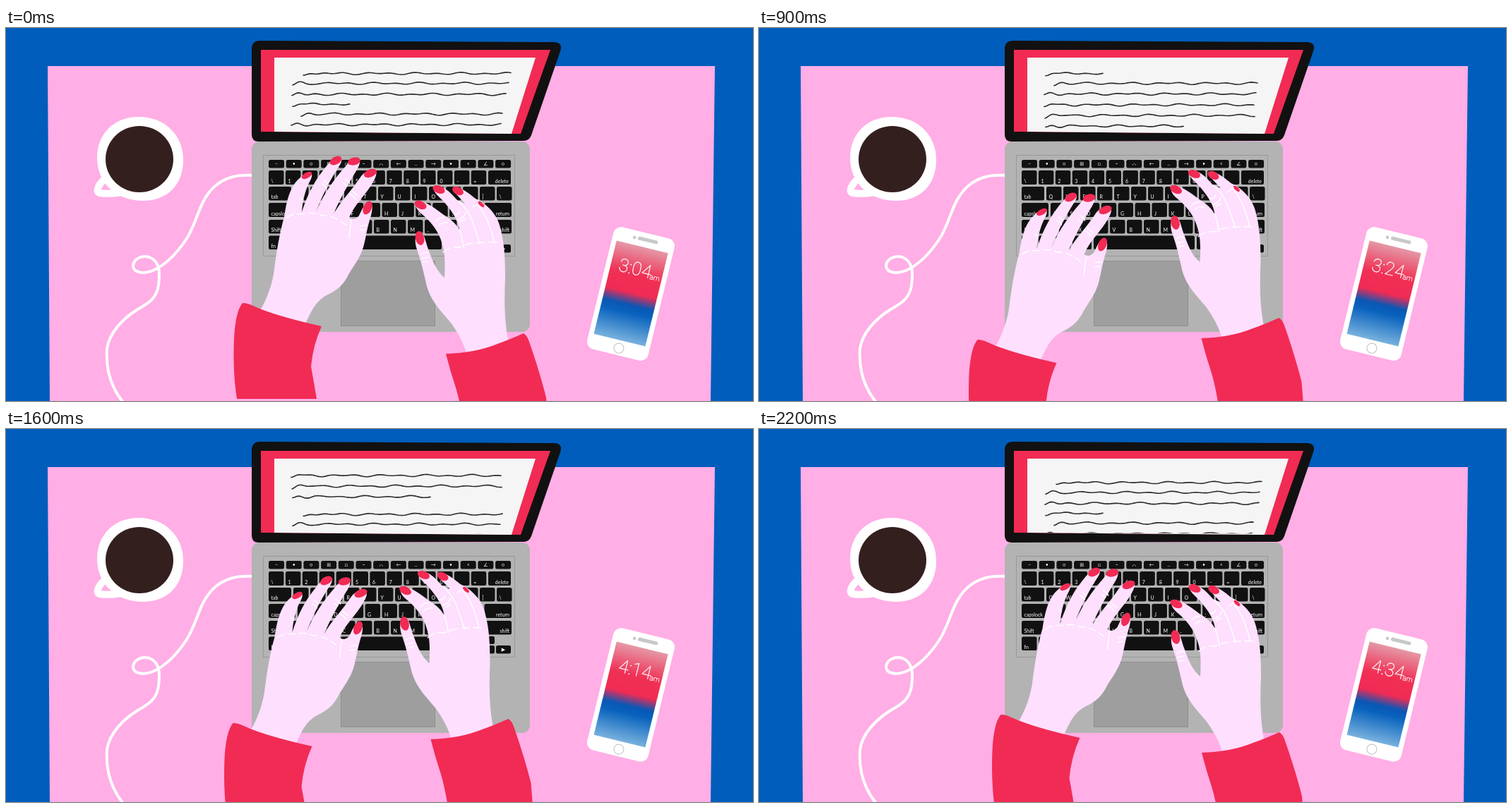
An HTML page that plays this animation: 1058 px wide and 529 px high, repeating every 2.4 s.

```html
<!DOCTYPE html>
<html lang="en">
<meta charset="utf-8">
<title>Typing through the night</title>
<style>
html, body { margin: 0; width: 100%; height: 100%; overflow: hidden; background: #005dbb }
svg { display: block; width: 100%; height: 100% }
.red { fill: #f12b54 }
.skin { fill: #fedffe }
.ink { fill: none; stroke: #fff; stroke-width: 1.5; stroke-linecap: round; stroke-linejoin: round }
#keys rect { fill: #111 }
#keys text { fill: #fff; font: 7px Lato, "Noto Sans", sans-serif }
#clock { fill: #fff; stroke: #fff; stroke-width: .4; font: 100 26px Roboto, sans-serif }
</style>
<svg viewBox="0 0 1058 529">
  <defs>
    <linearGradient id="dusk" x2="0" y2="1">
      <stop offset="0" stop-color="#e498a6"/>
      <stop offset=".3" stop-color="#f03055"/>
      <stop offset=".49" stop-color="#f12b54"/>
      <stop offset=".62" stop-color="#0a57b4"/>
      <stop offset=".7" stop-color="#0862bd"/>
      <stop offset="1" stop-color="#78b1de"/>
    </linearGradient>
    <clipPath id="page"><path d="M380 58H745L716 148.500L380 147Z"/></clipPath>
  </defs>
  <rect width="1058" height="529" fill="#005dbb"/>
  <path d="M59 54H1004L998 529H62Z" fill="#ffaee6"/>

  <!-- cable and cup -->
  <path class="ink" style="stroke-width:4" d="M350 209C325 208 313 212 300 221C273 241 272 275 255 300C241 321 227 335 210 343C195 350 181 347 180 338C180 327 193 322 203 325C219 331 218 349 216 365C213 385 200 391 185 400C166 412 146 432 143 455C141 485 149 510 166 531"/>
  <path d="M139 215C131 222 127 231 132 234Q146 236 164 233" fill="none" stroke="#fff" stroke-width="10" stroke-linejoin="round"/>
  <path d="M188 126C225 126 251 152 251 187C251 223 228 245 194 245C156 245 129 220 129 184C129 150 153 126 188 126Z" fill="#fff"/>
  <ellipse cx="189" cy="186" rx="48" ry="47" fill="#341f1f"/>

  <!-- laptop -->
  <rect x="348" y="161" width="394" height="270" rx="11" fill="#b3b3b3"/>
  <path d="M360 18L777 20Q789 21 785 33L744 152Q741 160 733 160L358 161Q348 161 348 151V30Q348 18 360 18Z" fill="#111"/>
  <path class="red" d="M361 31H771L729 150L361 147Z"/>
  <path d="M380 42H750L716 150L380 147Z" fill="#f5f5f5"/>
  <path id="text" clip-path="url(#page)" fill="none" stroke="#2b2b2b" stroke-width="1.6" stroke-linecap="round" stroke-linejoin="round"/>
  <rect x="364.500" y="180.500" width="356" height="143" fill="none" stroke="#989898"/>
  <rect x="474.500" y="330.500" width="133" height="92" fill="#9e9e9e" stroke="#8f8f8f"/>
  <g id="keys"></g>

  <!-- phone -->
  <g transform="translate(885 377) rotate(13.7)">
    <rect x="-44.500" y="-89" width="89" height="178" rx="11" fill="#fff"/>
    <rect x="-37.500" y="-68.500" width="75" height="136" fill="url(#dusk)"/>
    <circle cx="-14" cy="-79" r="2.300" fill="#c8c8c8"/>
    <rect x="-9" y="-82" width="29" height="5" rx="2.500" fill="#c8c8c8"/>
    <circle cx="1.700" cy="79" r="7" fill="#fff" stroke="#bdbdbd"/>
    <text id="clock" x="-26" y="-27.500"><tspan id="time"></tspan><tspan font-size="10" dx="-1" dy="1">am</tspan></text>
  </g>

  <g id="left">
    <path class="skin" d="M359 402C371 382 378 360 380 342C383 318 388 288 394 268C397 247 401 231 410 219C417 211 424 205 431 205C435 207 433 213 430 218C424 230 420 245 419 261C425 242 434 222 446 206C453 197 462 184 471 182C477 183 476 189 473 194C459 215 448 238 439 261C449 237 464 215 481 196C488 187 496 183 501 187C502 193 498 200 494 206C483 225 471 246 464 264C473 247 490 230 501 213C507 203 518 199 524 203C526 209 521 217 516 225C506 240 493 252 486 269Q494 274 500 266C504 258 508 247 515 246C520 249 519 258 517 266C511 284 510 297 506 311C501 327 492 338 486 348C479 363 470 371 458 377C439 386 433 400 424 420Z"/>
    <g class="red">
      <ellipse rx="8" ry="4" transform="translate(426 209) rotate(-28)"/>
      <ellipse rx="9" ry="5.500" transform="translate(467 188) rotate(-28)"/>
      <ellipse rx="9" ry="5.500" transform="translate(493 189) rotate(-14)"/>
      <ellipse rx="9.500" ry="5.500" transform="translate(516 206) rotate(-22)"/>
      <ellipse rx="5.800" ry="10" transform="translate(512 255) rotate(22)"/>
    </g>
    <path class="ink" stroke-dasharray="10 6" d="M398 269Q407 262 419 264Q435 260 448 266Q463 265 481 279"/>
    <path class="ink" d="M489 272Q487 285 486 298M417 241L421 244M447 221Q452 223 454 227M450 216L456 221M480 214Q486 217 487 221M478 220L483 224M486 235Q493 238 495 243M490 231L498 238M502 281Q507 279 510 280M501 287L508 286"/>
    <path class="red" d="M335 390Q342 390 350 394Q380 408 447 423Q435 449 432 480Q436 502 440 526H327Q321 488 323 440Q325 402 335 390Z"/>
  </g>

  <g id="right">
    <path class="skin" d="M653 464C648 446 640 432 630 418C616 401 600 386 595 362C591 344 588 331 582 314C578 303 579 290 587 289C593 291 594 304 599 316C605 333 611 346 621 354C622 337 622 319 618 307C613 287 600 273 589 264C580 257 577 247 583 245C594 245 608 256 620 265C630 271 637 277 642 286C640 271 630 257 617 243C608 235 602 227 607 223C617 222 629 232 639 244L650 249C644 241 632 232 633 226C640 223 653 232 665 242C681 249 696 265 700 283C706 305 707 328 707 354C706 382 705 413 712 447Z"/>
    <g class="red">
      <ellipse rx="9" ry="5.500" transform="translate(587 251) rotate(25)"/>
      <ellipse rx="9" ry="5.500" transform="translate(613 229) rotate(22)"/>
      <ellipse rx="8.500" ry="5.500" transform="translate(640 231) rotate(28)"/>
      <ellipse rx="5.500" ry="2.500" transform="translate(673 250) rotate(42)"/>
      <ellipse rx="6.200" ry="10" transform="translate(586 298) rotate(-12)"/>
    </g>
    <path class="ink" stroke-dasharray="11 6" d="M619 318Q628 309 642 311Q660 302 696 304"/>
    <path class="ink" d="M642 286Q646 296 648 311M641 246Q656 259 662 279Q667 292 671 306M668 250Q681 267 685 282Q689 291 691 303M588 321Q593 317 598 319M589 327L598 325M591 332L598 331M609 274Q614 268 620 269M613 280Q618 275 626 276M635 264Q641 266 643 259M640 272Q648 271 651 262M644 275L651 271M661 254L667 250"/>
    <path class="red" d="M623 462Q664 461 696 448Q713 442 733 433Q738 436 741 445Q756 488 765 524L768 562H648Q643 529 637 510Q629 486 623 462Z"/>
  </g>
</svg>
<script>
const el = id => document.getElementById(id);

// Keyboard
let keys = "";
function key(x, y, w, h, label = "", align = "start") {
  const safe = label.replace("<", "&lt;");
  const tx = { start: x + 3.5, middle: x + w / 2, end: x + w - 3 }[align];
  keys += `<rect x="${x}" y="${y}" width="${w}" height="${h}" rx="2.500"/>
    <text x="${tx}" y="${y + h - (h < 15 ? 3.5 : 2.5)}" text-anchor="${align}">${safe}</text>`;
}
function row(x, y, pitch, w, h, labels, align) {
  labels.forEach((s, i) => key(x + i * pitch, y, w, h, s, align));
}
row(372, 187, 24.7, 22, 11.5, [..."–•○⊞□~⌒←‥→•<∠○"], "middle");
row(372, 202, 23.9, 21.5, 20, [..."\\1234567890-="]);
key(683, 202, 32, 20, "delete", "end");
key(372, 225, 32, 19.5, "tab");
row(407, 225, 24, 21.5, 19.5, [..."QWERTYUIOP[]\\"]);
key(372, 248, 38, 20, "capslock");
row(413, 248, 23.9, 21.5, 20, [..."ASDFGHJKL;'"]);
key(677.5, 248, 38.5, 20, "return", "end");
key(372, 272, 50, 19.5, "Shift");
row(425, 272, 24, 21.5, 19.5, [..."ZXCVBNM,./"]);
key(667, 272, 49, 19.5, "shift", "end");
row(372, 294.5, 24, 21.5, 19.5, ["fn", "", ""]);
key(444, 294.5, 27, 19.5);
key(474, 294.5, 143, 19.5);
key(620, 294.5, 25, 19.5);
row(648, 307, 23, 21, 11.5, ["◀", "▼", "▶"], "middle");
key(671, 294, 21, 11, "▲", "middle");
el("keys").innerHTML = keys;

// Document lines: top offset, left end, right end
const period = 143;
const lines = [
  [0, 421, 717], [14, 406, 714], [29.5, 405, 714], [43.5, 406, 489], [57.5, 418, 708],
  [72.5, 404, 706], [88, 404, 703], [103, 405, 702], [118, 406, 602]
];
function wave([, x0, x1], i, y) {
  const end = Math.min(x1, 731.5 - .22 * y);
  let d = "";
  for (let x = x0; x <= end; x += 3) {
    const u = x - x0;
    const dy = 2.5 * Math.cos(u * .28) * Math.exp(-u / 16)
      + .9 * Math.sin(u * .19 + i * 2.1) + .8 * Math.sin(u * .105 + i * 4.7);
    d += `${d ? "L" : "M"}${x} ${(y + dy).toFixed(1)}`;
  }
  return d;
}
function drawText(top) {
  let d = "";
  for (const shift of [0, period])
    lines.forEach((line, i) => {
      const y = top + shift + line[0];
      if (y > 60 && y < 152) d += wave(line, i, y);
    });
  el("text").setAttribute("d", d);
}

// Poses
const starts = [0, 300, 600, 900, 1200, 1400, 1600, 1800, 2000, 2200];
const tops = [64.5, 50.5, 35.5, 21, 6.7, -7, -22, -36, -51.5, -67];
const times = ["3:04", "3:24", "3:44", "4:14", "4:34"];
const leftPoses = [[0, 0], [-25.5, 24.5], [-25.5, 52], [-.5, 45], [-13.5, 27], [7.5, 15]];
const leftOrder = [0, 1, 1, 2, 3, 3, 4, 4, 5, 5];
const rightPoses = [[0, 0], [-24, 11.5], [3.5, -22], [-21.5, -22], [-2.5, -8.5], [4, -3]];
const rightOrder = [0, 1, 2, 2, 2, 3, 3, 4, 4, 5];
const move = (id, pose) => el(id).setAttribute("transform", `translate(${pose})`);

let shown = -1;
function tick() {
  const t = performance.now() % 2400;
  const step = starts.findLastIndex(s => s <= t);
  if (step !== shown) {
    shown = step;
    move("left", leftPoses[leftOrder[step]]);
    move("right", rightPoses[rightOrder[step]]);
    el("time").textContent = times[step >> 1];
    drawText(tops[step]);
  }
  requestAnimationFrame(tick);
}
tick();
</script>
</html>
```
